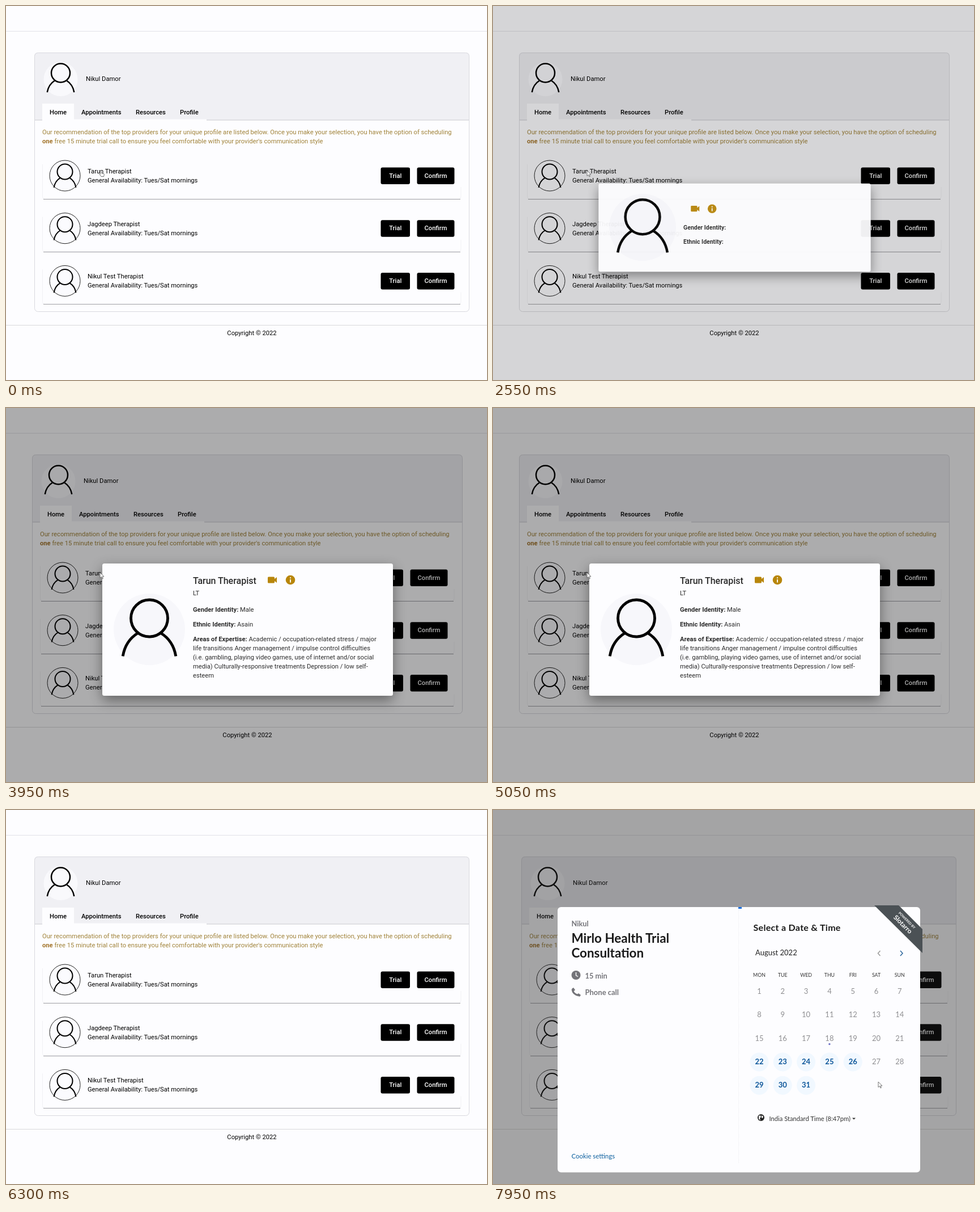
These frames come from a looping animation (849x659 px, 8000 ms). An HTML page:

```html
<!DOCTYPE html>
<html lang="en">
<head>
<meta charset="utf-8">
<title>Provider selection</title>
<style>
  html, body { margin: 0; width: 100%; height: 100%; overflow: hidden; background: #fdfdff; }
  svg { display: block; width: 849px; height: 659px; font-family: Roboto, sans-serif; font-size: 11.2px; }
  text { white-space: pre; }
  .person { fill: none; stroke: #000; stroke-width: .15; }
  .popup { font-family: Lato, sans-serif; }
  #dialog { transform-origin: 426.5px 390px; }
  #sheet { filter: drop-shadow(0 8px 11px rgba(0, 0, 0, .42)); }
</style>
</head>
<body>
<svg id="stage" viewBox="0 0 849 659"></svg>
<script>
const LOOP = 8000;
const ROWS = ['Tarun Therapist', 'Jagdeep Therapist', 'Nikul Test Therapist'];

// Text is placed by its vertical middle.
const text = (x, y, s, attrs = '') => `<text x="${x}" y="${y + 4}" ${attrs}>${s}</text>`;
const rect = (x, y, w, h, attrs = '') => `<rect x="${x}" y="${y}" width="${w}" height="${h}" ${attrs}/>`;
const circle = (x, y, r, attrs = '') => `<circle cx="${x}" cy="${y}" r="${r}" ${attrs}/>`;
const line = (x1, x2, y, color) => `<path d="M${x1} ${y}H${x2}" stroke="${color}"/>`;
const group = (id, body, attrs = '') => `<g id="${id}" ${attrs}>${body}</g>`;
const MEDIUM = 'font-weight="500"', BOLD = 'font-weight="700"', MID = 'text-anchor="middle"';

const person = (x, y, r) => `<g class="person" transform="translate(${x} ${y}) scale(${r})">
  <circle r="1"/><path d="M-1.44 2.06Q-1.3 1.22-.62 .8M1.44 2.06Q1.3 1.22 .62 .8"/></g>`;

const button = (x, y, w, label) => rect(x, y - 14.5, w, 29.5, 'rx="3"') +
  text(x + w / 2, y - .5, label, `${MID} ${MEDIUM} fill="#fff"`);

function row(name, i, left, right) {
  const y = 299 + i * 92.7;
  return `<path d="M${left + 14.5} ${y - 20}V${y + 37}q0 4 4 4H${right - 19}q4 0 4-4V${y + 20}" fill="none" stroke="#f1f1f4"/>` +
    line(left + 16, right - 16, Math.round(y + 41) + .5, '#a2a2a6') +
    circle(left + 54, y, 27, 'fill="#fbfbfe" stroke="#222"') + person(left + 54, y - 7, 13.5) +
    text(left + 94, y - 8, name) + text(left + 94, y + 8, 'General Availability: Tues/Sat mornings') +
    button(right - 156.5, y, 51.5, 'Trial') + button(right - 92.5, y, 66, 'Confirm');
}

function page(left, right) {
  const w = right - left, mid = (left + right) / 2;
  const tabs = [['Home', 27], ['Appointments', 83], ['Resources', 179], ['Profile', 257]];
  return rect(0, 0, 849, 659, 'fill="#fdfdff"') + line(0, 849, 44.5, '#e2e2e8') + line(0, 849, 562.5, '#d9d9da') +
    `<path d="M${left} 201V88q0-6 6-6H${right - 6}q6 0 6 6V201Z" fill="#f0f0f4"/>` +
    line(left, right, 201, '#c9c9cf') +
    rect(left + 14, 172, 56, 30, 'fill="#fdfdff"') + rect(left + 14, 199.5, 290, 3, 'fill="#fdfdff"') +
    rect(left + .5, 82.5, w - 1, 456, 'rx="6" fill="none" stroke="#d9d9de"') +
    circle(left + 46.5, 129, 30, 'fill="#f9f9fc"') + person(left + 46.5, 118, 16.5) +
    text(left + 91, 127.5, 'Nikul Damor') +
    tabs.map(([s, x]) => text(left + x, 186.5, s, MEDIUM)).join('') +
    `<g fill="#a08238">` +
    text(left + 14, 222, 'Our recommendation of the top providers for your unique profile are listed below. Once you make your selection, you have the option of scheduling') +
    text(left + 14, 238, `<tspan ${BOLD} fill="#a3742a">one</tspan> free 15 minute trial call to ensure you feel comfortable with your provider's communication style`) +
    '</g>' + ROWS.map((name, i) => row(name, i, left, right)).join('') +
    text(mid, 576, 'Copyright © 2022', MID);
}

function dialog() {
  const areas = ['life transitions Anger management / impulse control difficulties',
    '(i.e. gambling, playing video games, use of internet and/or social',
    'media) Culturally-responsive treatments Depression / low self-', 'esteem'];
  const icons = `<g fill="#b8860b"><rect x="462" y="297.5" width="12" height="11" rx="1.5"/>
    <path d="M473 302l5-4v10l-5-4z"/><circle cx="502" cy="303" r="8.3"/></g>
    <path d="M502 302v5.5M502 298.3v2" stroke="#fff" stroke-width="1.8"/>`;
  const labels = text(330, 354.5, 'Gender Identity:', BOLD) + text(330, 380.5, 'Ethnic Identity:', BOLD);
  const details = text(330, 306, ROWS[0], `${MEDIUM} font-size="16"`) + text(330, 326, 'LT') +
    text(413, 354.5, 'Male') + text(408, 380.5, 'Asain') +
    text(330, 406.5, `<tspan ${BOLD}>Areas of Expertise:</tspan> Academic / occupation-related stress / major`) +
    areas.map((s, i) => text(330, 422.5 + i * 16, s)).join('');
  return '<rect id="sheet" x="170" width="513" rx="3.5" fill="#fdfdff"/>' +
    circle(253, 390, 63, 'fill="#f7f7fb"') + person(253, 370.5, 32.5) +
    `<g fill="#2b2b2b">${group('icons', icons)}${group('labels', labels)}${group('details', details)}</g>`;
}

function calendar() {
  const col = i => 470 + i * 41.3;
  let out = ['MON', 'TUE', 'WED', 'THU', 'FRI', 'SAT', 'SUN']
    .map((s, i) => text(col(i), 289.5, s, `${MID} font-size="8.8" fill="#333"`)).join('');
  for (let day = 1; day <= 31; day++) {
    const x = col((day - 1) % 7), y = 320 + Math.floor((day - 1) / 7) * 41.3;
    const open = day >= 22 && day !== 27 && day !== 28;
    if (open) out += circle(x, y, 16.5, 'fill="#f1f8ff"');
    out += text(x, y, day, `${MID} font-size="13" ` + (open ? `${BOLD} fill="#0b5599"` : 'fill="#8f8f92"'));
  }
  return out + circle(col(3), 412.5, 1.7, 'fill="#7377c8"');
}

function booking() {
  const gray = `${BOLD} fill="#747479"`;
  return `<path d="M433.5 171V623" stroke="#ececf0" stroke-dasharray="1 1"/>` + rect(433, 171, 6, 3, 'fill="#1a6fe0"') +
    text(138.5, 201, 'Nikul', `${gray} font-size="12.8"`) +
    `<g ${BOLD} font-size="22.4" fill="#1a1a1a">` + text(138.5, 230, 'Mirlo Health Trial') + text(138.5, 256, 'Consultation') + '</g>' +
    circle(146.5, 291, 8, 'fill="#747479"') + '<path d="M146.5 286v5.5l3.5 2" fill="none" stroke="#fff" stroke-width="1.4"/>' +
    text(162.5, 293, '15 min', `${gray} font-size="12.8"`) +
    '<path d="M140 316Q141 325 152 327" fill="none" stroke="#747479" stroke-width="3"/><path d="M139 315l3-2 3 4-3 3zM148 325l3-2 4 3-2 3z" fill="#747479"/>' +
    text(162.5, 322, 'Phone call', `${gray} font-size="13"`) +
    text(138.5, 610, 'Cookie settings', 'font-size="11.4" fill="#0b5f9e"') +
    text(459.5, 208.5, 'Select a Date &amp; Time', `${BOLD} font-size="16" letter-spacing=".3" fill="#1a1a1a"`) +
    text(463, 252, 'August 2022', 'font-size="13" fill="#222"') +
    '<g fill="none" stroke-width="1.5"><path d="M683.5 248l-4 4.5 4 4.5" stroke="#999"/><path d="M719 248l4 4.5-4 4.5" stroke="#2b659b"/></g>' +
    calendar() +
    circle(473, 542, 6, 'fill="#222"') + '<path d="M469 539l3-1 1 3-2 2 1 4-3-3zM474 538l3 2-1 3-2-1z" fill="#fff"/>' +
    text(487.5, 543.5, 'India Standard Time (8:47pm)', 'font-size="11.2" fill="#333"') +
    '<path d="M634 542.5h6l-3 3z" fill="#333"/>' +
    '<path d="M673 168H716L758 210V252Z" fill="#4b5155"/>' +
    `<g transform="translate(726 199) rotate(45)" fill="#fff" ${MID} ${BOLD}>` +
    text(0, -8.5, 'POWERED BY', 'font-size="6"') + text(0, 3.5, 'Slotarro', 'font-size="11.5"') + '</g>';
}

const stage = document.getElementById('stage');
stage.innerHTML = group('wide', page(50, 818)) + group('narrow', page(46, 806)) +
  rect(0, 0, 849, 659, 'id="shade"') + group('dialog', dialog()) +
  group('overlay', rect(0, 0, 849, 659, 'fill="#1f1f1f" fill-opacity=".4"') +
    group('dots', [0, 1, 2].map(i => circle(416 + i * 18, 404, 7, 'fill="#e1e1e1"')).join('')) +
    group('panel', rect(114, 171, 640, 467.5, 'rx="6" fill="#fdfdff"') + group('booking', booking()), 'class="popup"')) +
  group('cursor', '<path id="arrow" d="M0 0V9.5l2.3-2 1.7 3.5 1.4-.7-1.6-3.3H7Z"/>' +
    '<path id="hand" d="M2 0q1.3 0 1.3 1.2V4.5l4.2 1q1 .4 .8 1.6L7.500 10.500H3L.1 6.500q.3-1 1.200-.2V1.200Q1.300 0 2 0Z"/>',
    'fill="#fff" stroke="#555" stroke-width=".8"');

const $ = id => document.getElementById(id);
const show = (id, on) => { $(id).style.display = on ? '' : 'none'; };
const part = (t, start, length) => Math.min(1, Math.max(0, (t - start) / length));
const easeOut = (p, power) => 1 - (1 - p) ** power;

const OPEN = 2470, LOADED = 2800, CLOSE = 5960, WIDE_AGAIN = 6270, BOOK = 6900, PANEL = 7700, READY = 7800;

// time, x, y of the pointer tip
const PATH = [[0, 165, 290], [450, 165, 290], [850, 180, 222], [1200, 230, 190], [1450, 115, 150],
  [1700, 150, 215], [2100, 166, 290], [5250, 166, 290], [5900, 800, 420], [6150, 862, 440], [6350, 862, 440], [6750, 680, 479], [8000, 680, 479]];

function pointer(t) {
  const i = Math.max(1, PATH.findIndex(p => p[0] > t));
  const [t0, x0, y0] = PATH[i - 1], [t1, x1, y1] = PATH[i];
  const p = part(t, t0, t1 - t0), e = p * p * (3 - 2 * p);
  return [x0 + (x1 - x0) * e, y0 + (y1 - y0) * e];
}

function render(t) {
  const narrow = t >= 2325 && t < WIDE_AGAIN;
  show('narrow', narrow);
  show('wide', !narrow);

  const dim = easeOut(part(t, OPEN, 400), 3) - easeOut(part(t, CLOSE, 310), 3);
  $('shade').setAttribute('opacity', .32 * dim);

  const enter = part(t, OPEN, 150), leave = part(t, CLOSE, 75), loaded = t >= LOADED;
  show('dialog', enter > 0 && leave < 1);
  $('dialog').style.opacity = Math.min(1, enter * 1.75) * (1 - leave);
  $('dialog').style.transform = `scale(${.7 + .3 * easeOut(enter, 2)})`;
  const height = loaded ? 233 : 166;
  $('sheet').setAttribute('y', 390.5 - height / 2);
  $('sheet').setAttribute('height', height);
  $('icons').setAttribute('transform', loaded ? '' : 'translate(-118 52)');
  $('labels').setAttribute('transform', loaded ? '' : 'translate(0 36)');
  show('details', loaded);

  show('overlay', t >= BOOK);
  show('dots', t < PANEL);
  show('panel', t >= PANEL);
  show('booking', t >= READY);
  [...$('dots').children].forEach((dot, i) => {
    const phase = (t - BOOK + 320 - i * 160) / 1400;
    dot.setAttribute('r', 7 * Math.max(0, Math.sin(phase * 2 * Math.PI)));
  });

  const [x, y] = pointer(t);
  $('cursor').setAttribute('transform', `translate(${x} ${y})`);
  const hand = t < 600 || (t > 2000 && t < OPEN) || (t > 6700 && t < BOOK);
  show('hand', hand);
  show('arrow', !hand);
}

const start = performance.now();
function tick() {
  render((performance.now() - start) % LOOP);
  requestAnimationFrame(tick);
}
tick();
</script>
</body>
</html>
```
